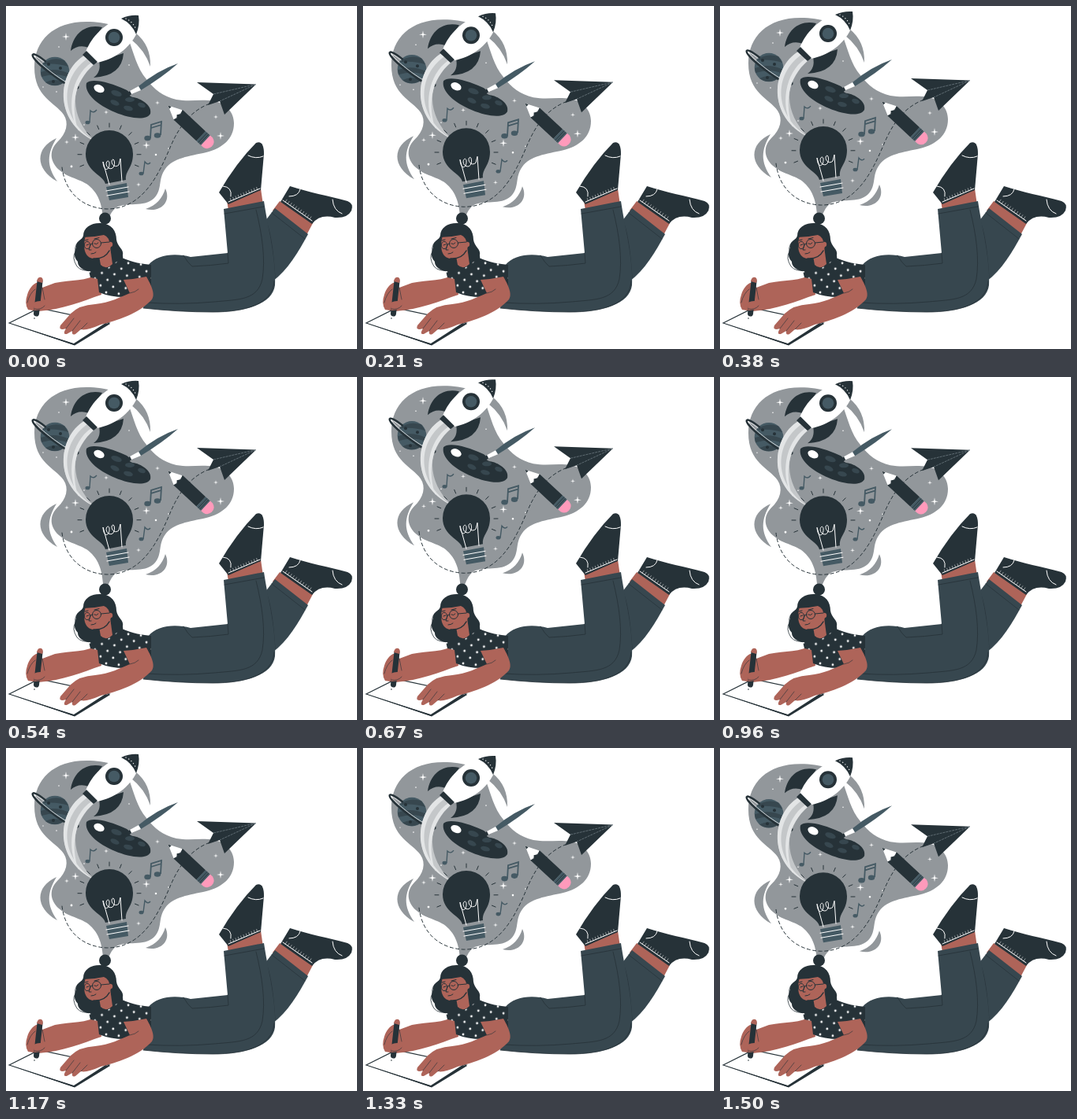
These frames come from a looping animation (445 by 436 pixels, 1540 ms). An HTML page:

```html
<!DOCTYPE html>
<html lang="en">
<head>
<meta charset="utf-8">
<title>Daydreaming writer</title>
<style>
html, body { margin: 0; height: 100%; overflow: hidden; background: #fff; }
svg { display: block; width: 100vw; height: 100vh; }
.ink { fill: #263238; }
.slate { fill: #455a64; }
.pants { fill: #37474f; }
.skin { fill: #ae6459; }
.grey { fill: #92979b; }
.white { fill: #fff; }
.line { fill: none; stroke: #263238; stroke-linecap: round; stroke-linejoin: round; }
.light { fill: none; stroke: #fff; stroke-linecap: round; stroke-linejoin: round; }
</style>
</head>
<body>
<svg viewBox="0 0 445 436">
<defs>
  <pattern id="dots" width="16" height="16" patternUnits="userSpaceOnUse" patternTransform="translate(118 335) rotate(6)">
    <rect width="16" height="16" class="ink"/>
    <circle cx="4" cy="4" r="1.4" class="white"/>
    <circle cx="12" cy="12" r="1.4" class="white"/>
  </pattern>
</defs>

<g id="dream">
  <g class="grey">
    <path d="M36 78C36 44 60 20 102 20C128 20 148 26 156 44C162 60 166 79 178 93C188 106 199 115 216 119C234 122 247 118 264 121C280 124 289 136 289 149C289 169 274 181 254 186C232 191 212 193 202 207C192 220 199 234 187 245C175 256 153 249 140 256C133 261 131 268 127 278H124C122 262 122 246 109 232C99 220 80 220 67 208C55 197 55 183 65 173C77 162 80 148 73 138C62 122 36 116 36 78Z"/>
    <path d="M164 34Q184 50 183 77Q176 56 158 42Z"/>
    <path d="M64 168C37 180 36 207 65 223C51 203 52 188 64 168Z"/>
    <path d="M202 232C210 249 196 263 177 258C191 253 198 245 202 232Z"/>
  </g>

  <path class="line" stroke-width="1" stroke-dasharray="4 3.5" stroke-linecap="butt"
    d="M265 122C235 130 219 154 208 180C192 218 172 258 128 258C98 257 75 238 71 205"/>

  <!-- planet -->
  <circle cx="62" cy="83" r="18.3" class="slate"/>
  <path class="pants" d="M46 74Q58 64 74 69L79 77Q65 72 46 74ZM44 84Q62 77 80 86L79 91Q65 84 45 90ZM50 97Q62 91 74 97Q61 105 50 97Z"/>
  <g class="ink"><circle cx="54" cy="74" r="2"/><circle cx="69" cy="79" r="2"/><circle cx="60" cy="96" r="2"/></g>
  <g transform="translate(62 83) rotate(32)">
    <path class="line" stroke-width="2.4" d="M-17 -4.5C-44 -8 -43 2 0 5.5C44 9 45 -1 17 -3.5"/>
    <path class="light" stroke-width=".7" d="M-18 -2.5C-38 -5 -36 0 0 3.500C36 6 37 0 18 -2"/>
  </g>

  <!-- rocket -->
  <path fill="#c4c7c9" d="M100 63C66 82 58 145 113 172C80 142 80 98 111 74Z"/>
  <path fill="#e3e5e6" d="M99 63C66 83 58 146 113 172C67 144 68 92 103 67ZM108 72C82 90 76 132 92 159C82 130 85 97 112 74Z"/>
  <path class="ink" d="M122 27C101 22 85 35 82 57Q92 48 105 53ZM149 60Q147 89 111 91Q121 84 118 70Z"/>
  <path class="white" d="M148 15C126 21 109 38 101 58L115 72C137 68 157 54 166 34Z"/>
  <path class="ink" d="M146 16Q157 11 168 12Q170 24 165 36Q159 22 146 16ZM97 62L102 57L116 71L111 75Z"/>
  <path class="light" stroke-width="1.3" stroke-dasharray=".1 4" d="M152 16Q161 20 165 30"/>
  <circle cx="137" cy="40" r="11" class="ink"/>
  <circle cx="137" cy="40" r="7.3" class="slate"/>

  <!-- palette and brush -->
  <path class="ink" d="M102 98C108 91 132 97 151 106C161 110 151 113 161 116C170 117 186 126 183 137C178 146 157 143 138 135C116 126 99 111 102 98Z"/>
  <ellipse cx="118" cy="105" rx="7" ry="4.700" transform="rotate(25 118 105)" class="white"/>
  <g class="pants">
    <ellipse cx="140" cy="111" rx="7" ry="3.500" transform="rotate(20 140 111)"/>
    <ellipse cx="138" cy="123" rx="6" ry="3" transform="rotate(25 138 123)"/>
    <ellipse cx="157" cy="119" rx="6" ry="3"/>
    <ellipse cx="155" cy="130" rx="6" ry="3" transform="rotate(15 155 130)"/>
    <ellipse cx="172" cy="126" rx="5" ry="3" transform="rotate(20 172 126)"/>
  </g>
  <path class="slate" d="M168 102Q192 82 218 73Q199 90 171 107Z"/>
  <path class="white" d="M157 108L168 102L171 107L159 112Z"/>
  <path class="ink" d="M157 108L159 112Q153 118 147 115Q153 112 157 108Z"/>

  <!-- pencil -->
  <g transform="translate(205.500 126.500) rotate(43)">
    <path class="white" d="M0 0L18 -8.500V8.500Z"/>
    <path class="ink" d="M0 0L4 -1.800V1.800ZM17 -8.500H57V8.500H17L19 4L16 1L19 -3Z"/>
    <path class="slate" d="M57 -8.500H65V8.500H57Z"/>
    <path fill="#ff9abb" d="M65 -8.500H69Q76 -7 76 0Q76 7 69 8.500H65Z"/>
    <path class="line" stroke-width=".8" d="M60 -8V8M62.500 -8V8"/>
  </g>

  <!-- paper plane -->
  <path class="ink" d="M242 97L317 99.500L277 138L271 121L256 126L263 112Z"/>
  <path fill="none" stroke="#78858b" stroke-width=".7" stroke-dasharray="3 1" d="M263 112L317 99.500L271 121"/>

  <!-- light bulb -->
  <path class="ink" d="M126 226C124 215 101 211 101 188A30 30 0 0 1 161 188C161 206 151 209 152 221Z"/>
  <path class="light" stroke-width="1" d="M131 227L123 198C124 213 132 208 131 199C129 193 124 202 130 206C138 210 139 197 136 195C131 196 136 208 143 202L145 194L147 223"/>
  <path class="slate" d="M127 230L153 225L155 243L131 247Z"/>
  <path class="light" stroke-width="1" d="M127 235L155 230M128 241L156 236"/>
  <g id="rays" class="line" stroke-width="1"></g>

  <!-- music notes -->
  <g fill="none" stroke="#455a64" stroke-width="1.8">
    <path d="M183 168L184 151L197 147L196 164M184 155L197 151"/>
    <path stroke-width="1.400" d="M106 148L107 133Q111 137 115 132M174 213L176 198Q180 203 183 199"/>
  </g>
  <g class="slate">
    <ellipse cx="179.500" cy="168" rx="4.200" ry="3.300"/>
    <ellipse cx="192" cy="164.500" rx="4.200" ry="3.300"/>
    <ellipse cx="103.500" cy="148" rx="3" ry="2.300"/>
    <ellipse cx="171.500" cy="213" rx="3" ry="2.300"/>
  </g>
  <path id="stars" class="white"/>
</g>

<!-- legs -->
<path class="skin" d="M338 260L347 248L389 276L380 293Z"/>
<path class="ink" d="M348 249L360 229C384 237 408 241 433 248Q441 251 438 260Q433 270 417 269Q398 264 388 277Z"/>
<path class="light" stroke-width="1" d="M359 242Q371 242 373 233M414 246Q415 260 426 264M351 247L388 273"/>
<path class="pants" d="M325 278L341 257L383 290C371 312 357 336 338 350Z"/>
<path class="line" stroke-width=".7" d="M337 263L379 296M331 277Q338 296 341 345"/>
<path class="skin" d="M280 247L323 232L326 253L282 260Z"/>
<path class="ink" d="M270 237Q292 199 317 174Q327 170 327 188L323 234L282 252Z"/>
<path class="light" stroke-width="1" d="M275 229Q287 230 285 242M307 190Q317 195 326 191M282 249L322 232"/>
<g id="cuffs" class="light" stroke-width=".5"></g>
<path class="pants" d="M180 330C191 315 216 314 234 319L281 314L276 258L327 248C332 282 343 325 341 355C338 379 304 389 262 389Q219 389 174 384Z"/>
<path class="line" stroke-width=".8" d="M277 264L327 255M317 259C325 291 329 322 325 347C319 374 296 373 264 376Q220 380 178 377M225 317Q230 326 236 331Q260 330 282 327L281 314M340 350C338 379 304 389 262 389Q219 389 174 384"/>

<!-- paper -->
<path class="white" stroke="#263238" stroke-width="1.200" d="M4 403L42 384L131 403L86 430Z"/>
<path class="ink" d="M4 403L86 429L126 403L132 404L87 431.500Z"/>

<!-- writing arm -->
<path class="skin" d="M118 340C102 350 83 348 62 352L46 358C41 344 30 357 27 367Q23 378 28 386L41 388C72 386 97 375 121 367Z"/>
<path class="line" stroke-width="7" stroke-linecap="butt" d="M43 350L38.500 391"/>
<path class="skin" d="M39 350Q40 344 45 345Q48 347 46 352ZM35 377Q46 372 51 379Q47 387 36 387Z"/>
<path class="line" stroke-width=".6" d="M46 358L49 373M36 385Q44 387 49 381M27 377Q30 365 37 360"/>
<circle cx="36" cy="397" r=".8" class="ink"/>

<!-- head -->
<circle cx="125.500" cy="270" r="7.500" class="ink"/>
<path class="ink" d="M98 292C98 281 109 275 121 276C134 277 140 286 140 297C141 306 150 309 148 317C150 325 142 330 134 333L118 338C105 339 91 335 91 325C84 317 88 312 89 305C89 298 96 299 98 292Z"/>
<path class="line" stroke-width=".8" d="M96 296Q86 303 88 312Q83 320 90 331Q96 338 109 336"/>
<path class="skin" d="M118 318L132 306L135 328Q127 336 120 329Z"/>
<path class="skin" d="M101 292C97 306 99 320 111 321C125 322 132 313 134 302Q134 294 128 291Q113 288 101 292Z"/>
<path class="line" stroke-width="1.500" d="M111 321Q125 322 131 311"/>
<path class="ink" d="M98 294Q103 281 121 280Q136 283 136 302L132 305Q131 293 124 291Q111 294 98 294Z"/>
<circle cx="132" cy="303" r="3.200" class="skin"/>
<g class="line" stroke-width="1">
  <circle cx="115" cy="302" r="5.500"/><ellipse cx="103" cy="304" rx="3.700" ry="4.700"/>
  <path d="M107 303L110 302M120.500 301L131 300M112 302Q115 304 117 301M102 304L105 303M112 296L118 294.500M100 298L104 297M107 304L105 310L108 310M108 315Q112 315 114 313"/>
</g>

<!-- shirt and resting arm -->
<path fill="url(#dots)" d="M105 337Q124 338 135 329L147 320C160 326 174 328 184 329V362L151 370Q132 370 118 364L116 347L107 345Z"/>
<path class="skin" d="M149 348Q164 347 178 344C183 353 190 366 185 373C169 391 140 400 120 405Q102 413 95 411L88 417Q83 419 84 413L77 417Q71 418 76 410Q66 413 69 406L82 391Q93 380 113 379C132 377 145 370 157 365Z"/>
<path class="line" stroke-width=".6" d="M157 365Q164 364 168 360M76 410L86 397M84 413L94 400M95 411L103 403"/>
</svg>

<script>
const LOOP = 1540, LEAD = 30, RISE = 10;
const byId = id => document.getElementById(id);
const segment = (x1, y1, x2, y2) =>
  `<path d="M${x1} ${y1}L${x2} ${y2}"/>`;

const star = ([x, y, r]) => {
  const k = r * 0.16;
  return `M${x} ${y - r}L${x + k} ${y - k}L${x + r} ${y}L${x + k} ${y + k}` +
    `L${x} ${y + r}L${x - k} ${y + k}L${x - r} ${y}L${x - k} ${y - k}Z`;
};
const dot = ([x, y, r]) => `M${x - r} ${y}a${r} ${r} 0 1 0 ${2 * r} 0a${r} ${r} 0 1 0 ${-2 * r} 0Z`;
const stars = [[76, 39, 5], [88, 167, 5], [178, 177, 5], [272, 165, 5], [77, 173, 3],
  [127, 135, 3], [192, 123, 3], [168, 227, 3], [266, 141, 3]];
const specks = [[67, 52, .8], [83, 204, 1.4], [190, 189, 1.3], [206, 181, .8],
  [64, 109, .8], [47, 103, .7], [156, 75, .8], [99, 151, .8]];
byId('stars').setAttribute('d', stars.map(star).join('') + specks.map(dot).join(''));

let rays = '';
for (let i = 0; i < 11; i++) {
  const a = (158 + i * 22.4) * Math.PI / 180, c = Math.cos(a), s = Math.sin(a);
  rays += segment(131 + 35 * c, 189 + 35 * s, 131 + 40 * c, 189 + 40 * s);
}
byId('rays').innerHTML = rays;

let cuffs = '';
for (let i = 1; i < 12; i++) {
  const u = i / 12;
  cuffs += segment(282 + 40 * u, 249 - 17 * u, 281 + 40 * u, 246 - 17 * u);
  cuffs += segment(351 + 37 * u, 247 + 26 * u, 353 + 37 * u, 244 + 26 * u);
}
byId('cuffs').innerHTML = cuffs;

// The dream rises and sinks at a constant speed.
const dream = byId('dream');
function draw() {
  const phase = (performance.now() + LEAD) % LOOP / LOOP;
  const lift = RISE * (1 - Math.abs(2 * phase - 1));
  dream.setAttribute('transform', `translate(0 ${0.4 - lift})`);
  requestAnimationFrame(draw);
}
draw();
</script>
</body>
</html>
```
